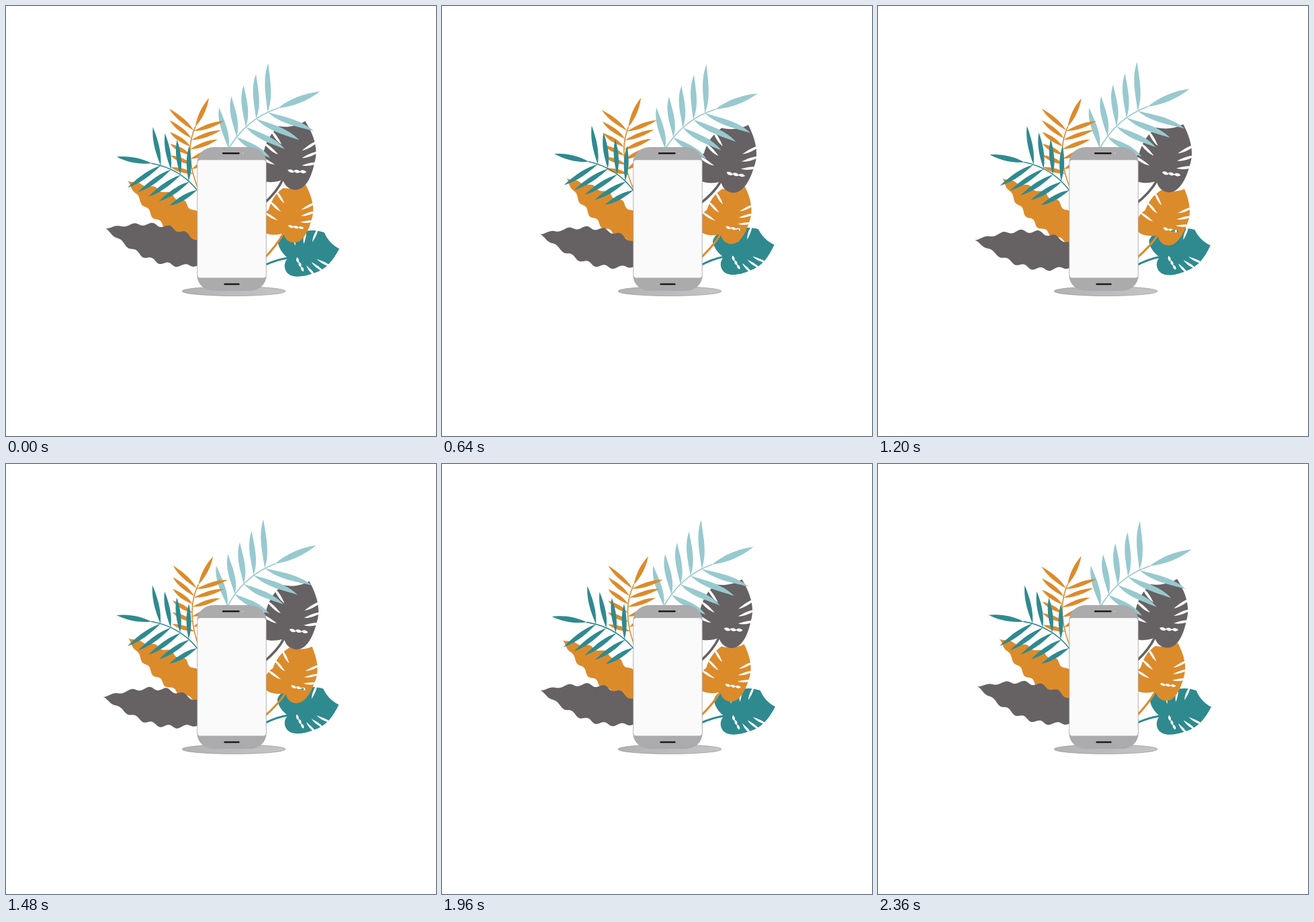
These frames come from a looping animation (640 px wide and 640 px high, 2400 ms). An HTML page:

```html
<!DOCTYPE html>
<html lang="en">
<head>
<meta charset="utf-8">
<title>Phone with swaying leaves</title>
<style>
  html, body { margin: 0; width: 100%; height: 100%; overflow: hidden; background: #fff; }
  svg { display: block; width: 100vw; height: 100vh; }
</style>
</head>
<body>
<svg viewBox="0 0 640 640">
  <defs>
    <linearGradient id="floor">
      <stop offset="0" stop-color="#b3b2b3"/>
      <stop offset="1" stop-color="#c6c5c6"/>
    </linearGradient>
    <mask id="slits" maskUnits="userSpaceOnUse" x="-60" y="-110" width="130" height="140">
      <rect x="-60" y="-110" width="130" height="140" fill="#fff"/>
      <path id="cuts"/>
    </mask>
  </defs>
  <g id="plants"></g>
  <ellipse cx="339" cy="424.5" rx="77" ry="7" fill="url(#floor)" stroke="#8f8e8f" stroke-width=".6"/>
  <rect x="284.3" y="210" width="103.4" height="214" rx="25" ry="23" fill="#abaaac"/>
  <rect x="285.2" y="229.3" width="101.6" height="175.2" rx="4" fill="#fafafa"/>
  <path d="M323 219.2H346.5M325.5 414H346.5" stroke="#1c1a1c" stroke-width="2.4" stroke-linecap="round"/>
  <circle cx="352.8" cy="219.2" r="1.8" fill="#c4c3c5" stroke="#929193" stroke-width=".5"/>
</svg>
<script>
const LOOP = 2400, STEP = 40;
const TEAL = '#2f8a8f', ORANGE = '#dc8b2b', GREY = '#666263', BLUE = '#97c9cf';
const MONSTERA = 'M33-87C46-66 53-46 47-25C42 0 32 16 18 15.5C9 15 2 9 0 0C-8 5-28 6-35 0' +
                 'C-44-12-41-28-29-39C-24-62-14-72-6-79C8-77 22-80 33-87Z';
const plants = document.getElementById('plants');
const parts = [];

function add(parent, tag, attrs) {
  const el = document.createElementNS('http://www.w3.org/2000/svg', tag);
  for (const k in attrs) el.setAttribute(k, attrs[k]);
  return parent.appendChild(el);
}

const lerp = (a, b, t) => a + (b - a) * t;
const mix = (p, q, t) => [lerp(p[0], q[0], t), lerp(p[1], q[1], t)];

// Point at distance f along p-q, moved sideways by o.
function beside(p, q, f, o) {
  const dx = q[0] - p[0], dy = q[1] - p[1], len = Math.hypot(dx, dy);
  return [p[0] + dx * f - dy / len * o, p[1] + dy * f + dx / len * o];
}

// Lens from base to tip: half width w, S-bend s.
function leaflet(base, tip, w, s = 0) {
  const k = w / 0.75, at = (f, o) => beside(base, tip, f, o);
  return `M${base}C${at(.33, s + k)} ${at(.67, k - s)} ${tip}C${at(.67, -k - s)} ${at(.33, s - k)} ${base}Z`;
}

// A group that turns about pivot, from angle a at ms ta to angle b at ms tb and back.
function plant(color, pivot, ta, a, tb, b) {
  const g = add(plants, 'g', { fill: color, stroke: 'none' });
  parts.push({ g, pivot, ta, a, tb, b });
  return g;
}

function stem(g, [p, c, q], width) {
  add(g, 'path', {
    d: `M${p}Q${c} ${q}`, fill: 'none', stroke: g.getAttribute('fill'),
    'stroke-width': width, 'stroke-linecap': 'round'
  });
}

// Each side has n leaflets: bases on the stem from t0 to t1, tips on a line.
function fern(g, curve, tip, width, bend, sides) {
  const [p, c, q] = curve;
  const onStem = t => mix(mix(p, c, t), mix(c, q, t), t);
  let d = leaflet(q, tip, width * 1.1);
  for (const { n, t0, t1, from, to } of sides)
    for (let i = 0; i < n; i++) {
      const f = i / (n - 1);
      d += leaflet(onStem(lerp(t0, t1, f)), mix(from, to, f), width, bend);
    }
  stem(g, curve, 1.6);
  add(g, 'path', { d });
}

function wavyLeaf(g, tip, end, half) {
  const upper = [], lower = [], n = 90;
  for (let i = 0; i <= n; i++) {
    const u = i / n, body = Math.sin(Math.PI * u);
    const w = half * body + 2.6 * Math.sqrt(body) * Math.cos((u - .215) * 2 * Math.PI / .14);
    upper.push(beside(tip, end, u, -w));
    lower.unshift(beside(tip, end, u, w));
  }
  add(g, 'path', { d: `M${upper.concat(lower).join('L')}Z` });
}

function monstera(g, curve, turn, scale) {
  stem(g, curve, 3.6 * scale);
  const place = `translate(${curve[2]}) rotate(${turn}) scale(${scale})`;
  add(add(g, 'g', { transform: place }), 'path', { d: MONSTERA, mask: 'url(#slits)' });
}

let cuts = '';
for (let i = 0; i < 3; i++) {
  cuts += leaflet([28, -43 + 11 * i], [56, -59 + 17 * i], 2, 1);
  cuts += leaflet([-2 - 5 * i, -52 + 15 * i], [-20 - 10 * i, -75 + 20 * i], 2, -1);
  cuts += leaflet([7 + 9 * i, -14 + i], [17 + 9 * i, -11], 2.3);
}
document.getElementById('cuts').setAttribute('d', cuts);

// Back to front.
monstera(plant(TEAL, [388, 384], 780, -3.4, 2240, .3), [[384, 386], [404, 377], [420, 375]], 59, .83);
monstera(plant(ORANGE, [385, 380], 20, 0, 1280, 5.2), [[384, 376], [404, 355], [413, 338]], 4, .85);
monstera(plant(GREY, [383, 295], 760, 5.4, 2300, 0), [[384, 294], [403, 277], [412, 258]], 0, 1);

fern(plant(BLUE, [318, 255], 580, 1.3, 1480, -2.3),
  [[329, 216], [356, 168], [404, 152]], [467, 127], 4.3, 3, [
    { n: 5, t0: .04, t1: .84, from: [317, 151], to: [390, 85] },
    { n: 4, t0: .24, t1: .84, from: [393, 226], to: [458, 186] }
  ]);

fern(plant(ORANGE, [290, 300], 780, -1.8, 1580, 2.7),
  [[285, 270], [264, 218], [281, 180]], [301, 137], 3.1, 1, [
    { n: 6, t0: .2, t1: .93, from: [245, 240], to: [242, 153] },
    { n: 5, t0: .27, t1: .92, from: [305, 226], to: [324, 171] }
  ]);

wavyLeaf(plant(ORANGE, [275, 350], 960, 2.8, 1900, -1.2), [181, 260], [323, 362], 23);
wavyLeaf(plant(GREY, [310, 375], 40, 0, 1240, -6.1), [148, 331], [325, 380], 27);

fern(plant(TEAL, [275, 280], 920, 2.5, 1780, -1.7),
  [[286, 276], [260, 242], [217, 234]], [165, 224], 3.5, 1, [
    { n: 4, t0: .25, t1: .84, from: [273, 208], to: [219, 180] },
    { n: 5, t0: .03, t1: .84, from: [243, 297], to: [181, 270] }
  ]);

function swing({ ta, a, tb, b }, t) {
  const since = (t - ta + LOOP) % LOOP, out = tb - ta;
  const f = since < out ? since / out : 1 + (since - out) / (LOOP - out);
  return lerp(a, b, (1 - Math.cos(Math.PI * f)) / 2);
}

function draw(t) {
  for (const part of parts)
    part.g.setAttribute('transform', `rotate(${swing(part, t).toFixed(3)} ${part.pivot.join(' ')})`);
}

const start = performance.now();
function tick() {
  const t = (performance.now() - start) % LOOP;
  draw(Math.floor(t / STEP) * STEP);
  requestAnimationFrame(tick);
}
tick();
</script>
</body>
</html>
```
